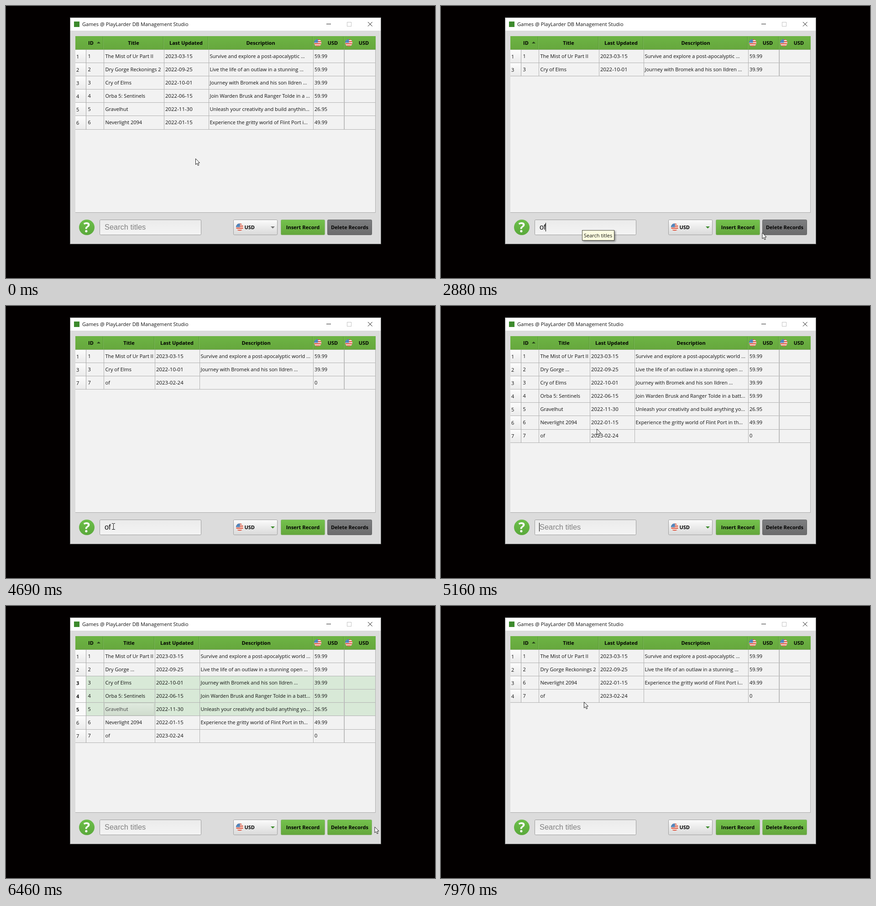
Animation of 940x596 px, one loop 8 s. Source, as an HTML page with a canvas:

```html
<!DOCTYPE html>
<html lang="en">
<head>
<meta charset="utf-8">
<title>Games database</title>
<style>
html, body { margin: 0; width: 100%; height: 100%; overflow: hidden; background: #030000; }
canvas { display: block; }
</style>
</head>
<body>
<canvas id="stage" width="940" height="596"></canvas>
<script>
const ctx = document.getElementById('stage').getContext('2d');
const LOOP = 8000;
const ROW_TOP = 94.95, ROW_PITCH = 29.1;
const UI = '"Open Sans", "Noto Sans", sans-serif';
const FIELD = '"Liberation Sans", Arial, sans-serif';
const REGULAR = '11px ' + UI;
const DATE = '11.45px ' + UI;
const BOLD = 'bold 11px ' + UI;

const T = {
  caretOn: 700, tip: 1580, typeO: 1650, typeF: 1740, hover: 2680,
  insert: 3100, refocus: 3960, eraseF: 4700, eraseO: 4770,
  select: 5840, remove: 6920
};

// Descriptions: shared stem, then the tail for the narrow and the wide column.
const GAMES = [
  { id: 1, title: 'The Mist of Ur Part II', date: '2023-03-15', price: '59.99',
    desc: ['Survive and explore a post-apocalyptic ', '...', 'world ...'] },
  { id: 2, title: 'Dry Gorge Reckonings 2', short: 'Dry Gorge ...', date: '2022-09-25', price: '59.99',
    desc: ['Live the life of an outlaw in a stunning ', '...', 'open ...'] },
  { id: 3, title: 'Cry of Elms', date: '2022-10-01', price: '39.99',
    desc: ['Journey with Bromek and his son Ildren ', '...', '...'] },
  { id: 4, title: 'Orba 5: Sentinels', date: '2022-06-15', price: '59.99',
    desc: ['Join Warden Brusk and Ranger Tolde in a ', '...', 'batt...'] },
  { id: 5, title: 'Gravelhut', date: '2022-11-30', price: '26.95',
    desc: ['Unleash your creativity and build anythin', '...', 'g yo...'] },
  { id: 6, title: 'Neverlight 2094', date: '2022-01-15', price: '49.99',
    desc: ['Experience the gritty world of Flint Port i', '...', 'n th...'] },
  { id: 7, title: 'of', date: '2023-02-24', price: '0', desc: ['', '', ''] }
];

// Pointer stops: time, x, y
const PATH = [
  [200, 415.5, 334.5], [860, 309, 480], [2510, 309, 480], [2880, 704, 497],
  [3040, 668, 487], [3120, 666, 486], [3340, 422, 489], [3440, 422, 489],
  [3630, 400, 496], [3960, 235, 483], [4700, 235, 483], [5160, 341.5, 269.5],
  [5480, 274, 272], [5500, 274, 272], [5690, 242.5, 163.5], [5800, 242.5, 163.5],
  [5990, 243.5, 219.5], [6200, 243.5, 219.5], [6460, 808, 484], [6540, 823, 489],
  [6720, 775, 479], [6930, 775, 479], [7300, 544, 364], [7400, 544, 364],
  [7970, 313.5, 210.5]
];

const between = (t, a, b) => t >= a && t < b;

function pointerAt(t) {
  if (t <= PATH[0][0]) return PATH[0].slice(1);
  for (let i = 1; i < PATH.length; i++) {
    const [t0, x0, y0] = PATH[i - 1], [t1, x1, y1] = PATH[i];
    if (t > t1) continue;
    const u = (t - t0) / (t1 - t0), e = u * u * (3 - 2 * u);
    return [x0 + (x1 - x0) * e, y0 + (y1 - y0) * e];
  }
  return PATH[PATH.length - 1].slice(1);
}

function queryAt(t) {
  if (between(t, T.typeF, T.eraseF)) return 'of';
  return between(t, T.typeO, T.eraseO) ? 'o' : '';
}

function caretAt(t) {
  return between(t, T.caretOn, 1230) || between(t, T.typeO, 2350) || between(t, 2880, T.insert) ||
    between(t, T.refocus, 4490) || between(t, T.eraseF, 5300);
}

function rect(x, y, w, h, fill) {
  ctx.fillStyle = fill;
  ctx.fillRect(x, y, w, h);
}

function shade(y, h, top, bottom) {
  const g = ctx.createLinearGradient(0, y, 0, y + h);
  g.addColorStop(0, top);
  g.addColorStop(1, bottom);
  return g;
}

function panel(x, y, w, h, fill, border, r = 2) {
  ctx.beginPath();
  ctx.roundRect(x + 0.5, y + 0.5, w - 1, h - 1, r);
  ctx.fillStyle = fill;
  ctx.fill();
  ctx.strokeStyle = border;
  ctx.lineWidth = 1;
  ctx.stroke();
}

function text(s, x, y, font = REGULAR, color = '#111', align = 'left') {
  ctx.font = font;
  ctx.fillStyle = color;
  ctx.textAlign = align;
  ctx.fillText(s, x, y);
}

function poly(points, fill, stroke) {
  ctx.beginPath();
  points.forEach(([x, y]) => ctx.lineTo(x, y));
  ctx.closePath();
  ctx.fillStyle = fill;
  ctx.fill();
  if (stroke) {
    ctx.strokeStyle = stroke;
    ctx.lineWidth = 1;
    ctx.stroke();
  }
}

function lines(color, ...segments) {
  ctx.beginPath();
  for (const [x0, y0, x1, y1] of segments) {
    ctx.moveTo(x0, y0);
    ctx.lineTo(x1, y1);
  }
  ctx.strokeStyle = color;
  ctx.lineWidth = 1;
  ctx.stroke();
}

function flag(x, y) {
  const stripe = 16 / 7;
  ctx.save();
  ctx.beginPath();
  ctx.arc(x, y, 8, 0, Math.PI * 2);
  ctx.clip();
  rect(x - 8, y - 8, 16, 16, '#f6efe9');
  for (let i = 0; i < 7; i += 2) rect(x - 8, y - 8 + i * stripe, 16, stripe, '#dc4e38');
  rect(x - 8, y - 8, 8.5, 8, '#2f6fb0');
  for (let i = 0; i < 9; i++) rect(x - 6 + (i % 3) * 2.3, y - 6.5 + (i / 3 | 0) * 2.3, 1, 1, '#dfe8f4');
  ctx.restore();
}

function drawWindow() {
  rect(0, 0, 940, 596, '#030000');
  rect(140, 25, 682, 497, '#707070');
  rect(141, 26, 680, 495, '#dcdcdc');
  rect(141, 26, 680, 28, '#fff');
  rect(149, 34, 12, 12, '#3c8a2c');
  text('Games @ PlayLarder DB Management Studio', 167, 44, '11.1px ' + UI);
  rect(702, 39, 10, 1, '#222');
  ctx.strokeStyle = '#c4c4c4';
  ctx.lineWidth = 1;
  ctx.strokeRect(747.5, 35.5, 9, 9);
  lines('#111', [793, 35, 802.5, 44.5], [802.5, 35, 793, 44.5]);
}

function drawHeader(cols) {
  rect(152, 66, 658, 30, shade(66, 30, '#6db444', '#66a73d'));
  cols.slice(1, -1).forEach(x => {
    rect(x - 1, 67, 1, 28, '#5c9838');
    rect(x, 67, 1, 28, '#7cbb58');
  });
  rect(152, 95, 658, 1, '#83a870');
  const mid = i => (cols[i] + cols[i + 1]) / 2 + 0.5;
  text('ID', 186, 85, BOLD, '#000', 'center');
  poly([[199, 82], [203, 78], [207, 82]], '#26421a');
  ['Title', 'Last Updated', 'Description'].forEach((s, i) =>
    text(s, mid(i + 1), 85, BOLD, '#000', 'center'));
  for (const x of [683, 751]) {
    flag(x, 80.5);
    text('USD', x + 33, 85, BOLD, '#000', 'center');
  }
}

function drawRow(game, i, label, cols, narrow, selected, current) {
  const y = ROW_TOP + i * ROW_PITCH;
  const top = Math.round(y), bottom = Math.round(y + ROW_PITCH);
  const h = bottom - top, base = Math.round(y + 18.7);
  rect(152, top + 1, 23, h - 1, selected ? '#fafafa' : shade(top, h, '#fdfdfd', '#ebebeb'));
  rect(176, top + 1, 633, h - 1, selected ? '#d8e9d7' : '#f2f2f2');
  if (current) {
    panel(cols[1] + 2, top + 1, cols[2] - cols[1] - 2, h - 1, shade(top, h, '#e1ebe0', '#cfdccd'), '#c3cfc1', 1);
  }
  rect(152, bottom, 658, 1, '#b2b2b2');
  rect(175, top, 1, h + 1, '#a6a6a6');
  cols.slice(1).forEach(x => rect(x === 810 ? 809 : x + 1, top, 1, h, '#b2b2b2'));
  rect(740, top, 1, h, '#c8c8c8');

  text(label, 154, base + 1, selected ? BOLD : REGULAR);
  text(game.id, 179.5, base);
  text(narrow && game.short || game.title, 217.5, base, REGULAR, current ? '#444' : '#111');
  text(game.date, cols[2] + 4, base, DATE);
  text(game.desc[0] + game.desc[narrow ? 2 : 1], cols[3] + 3.5, base);
  text(game.price, 676, base);
}

function drawTable(t) {
  const inserted = t >= T.insert, removed = t >= T.remove;
  const narrow = inserted && !removed;
  const c = narrow ? 325 : 345;
  const cols = [175, 213, c, c + 98, 672, 740, 810];
  const query = queryAt(t);
  const last = t < T.select ? 0 : t < 5900 ? 3 : t < 5960 ? 4 : 5;

  rect(152, 66, 658, 387, '#f2f2f2');
  rect(152, 452, 658, 1, '#a9a9a9');
  rect(809, 95, 1, 358, '#b0b0b0');
  GAMES
    .filter(g => (g.id < 7 || inserted) && !(removed && between(g.id, 3, 6)))
    .filter(g => g.title.toLowerCase().includes(query))
    .forEach((g, i) => {
      const selected = !removed && between(g.id, 3, last + 1);
      drawRow(g, i, removed ? i + 1 : g.id, cols, narrow, selected, selected && g.id === last);
    });
  drawHeader(cols);
}

function button(label, x, w, active) {
  panel(x, 468, w, 34,
    active ? shade(468, 34, '#74c24d', '#64a63c') : shade(468, 34, '#7d7e80', '#6b6b6c'),
    active ? '#8bb276' : '#626364');
  text(label, x + w / 2, 489, BOLD, '#000', 'center');
}

function drawControls(t) {
  ctx.beginPath();
  ctx.arc(177, 485, 17, 0, Math.PI * 2);
  ctx.fillStyle = shade(468, 34, '#6cbf49', '#5aa83b');
  ctx.fill();
  text('?', 177, 496, 'bold 30px ' + UI, '#fff', 'center');

  panel(205, 468, 223, 34, shade(468, 34, '#ebebeb', '#f4f4f4'), '#9c9c9c');
  const query = queryAt(t), font = '16.4px ' + FIELD;
  text(query || 'Search titles', 216, 490, font, query ? '#111' : '#808080');
  if (caretAt(t)) {
    ctx.font = font;
    rect(Math.floor(215.5 + ctx.measureText(query).width), 475, 1, 19, '#000');
  }

  panel(498, 468, 97, 34, shade(468, 34, '#fcfcfc', '#d9d9d9'), '#a0a0a0');
  flag(512, 484.5);
  text('USD', 522.5, 489, BOLD, '#000');
  poly([[580, 483], [589, 483], [584.5, 487.5]], t < T.hover ? '#707070' : '#3b8a2a');
  button('Insert Record', 602, 97, true);
  button('Delete Records', 704, 98, t >= T.select);
}

// The tip unrolls downward, its lower edge showing first.
function drawTip(t) {
  if (!between(t, T.tip, 3000)) return;
  const h = Math.min(23, 11 + (t - T.tip) / 5);
  ctx.save();
  ctx.beginPath();
  ctx.rect(309, 491, 76, h + (h < 23 ? 0 : 5));
  ctx.clip();
  ctx.translate(0, Math.round(h - 23));
  if (h === 23) {
    ctx.shadowColor = 'rgba(0,0,0,.45)';
    ctx.shadowBlur = 4;
    ctx.shadowOffsetX = ctx.shadowOffsetY = 2;
  }
  rect(309, 491, 71, 23, '#4a4a42');
  ctx.shadowColor = 'transparent';
  rect(310, 492, 69, 21, '#ffffe1');
  text('Search titles', 313, 507);
  ctx.restore();
}

function drawPointer(t) {
  const [x, y] = pointerAt(t);
  if (between(x, 205, 428) && between(y, 468, 502)) {
    const bx = Math.round(x), by = Math.round(y);
    rect(bx, by - 6, 1, 13, '#111');
    for (const dy of [-7, 6]) {
      rect(bx - 3, by + dy, 3, 1, '#111');
      rect(bx + 1, by + dy, 3, 1, '#111');
    }
    return;
  }
  const shape = [[0, 0], [0, 13], [3, 10.2], [5, 15], [7.2, 14.2], [5.2, 9.4], [9, 9.2]];
  poly(shape.map(([dx, dy]) => [x + dx, y + dy]), '#fff', '#222');
}

function frame() {
  const t = performance.now() % LOOP;
  drawWindow();
  drawTable(t);
  drawControls(t);
  drawTip(t);
  drawPointer(t);
  requestAnimationFrame(frame);
}
frame();
</script>
</body>
</html>
```
